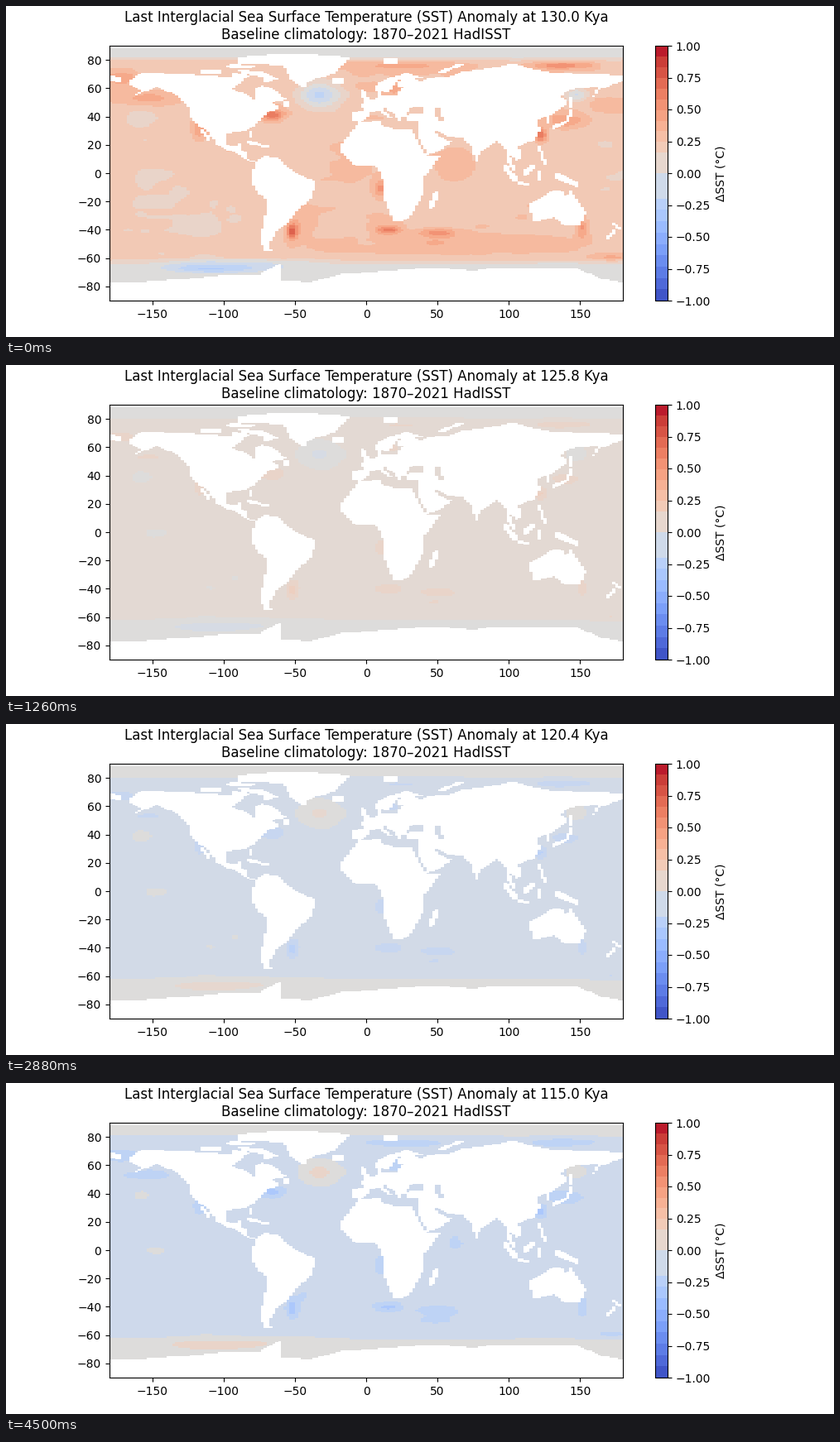
Write a matplotlib script that moves like this. It is 1000 px wide and 400 px high and loops after 4530 ms.

```python
import numpy as np
import matplotlib.pyplot as plt
from matplotlib.animation import FuncAnimation
from matplotlib.cm import ScalarMappable
from matplotlib.colors import ListedColormap, Normalize
from matplotlib.path import Path

FRAMES, INTERVAL = 151, 30
COOLWARM = plt.get_cmap("coolwarm")
NORM = Normalize(-1, 1)
LON, LAT = np.meshgrid(np.arange(-179, 180, 2), np.arange(-89.5, 90, 1))


def region(*coast):
    """Cells inside a coastline given as lon, lat pairs."""
    points = np.column_stack([LON.ravel(), LAT.ravel()])
    path = Path(np.reshape(coast, (-1, 2)))
    return path.contains_points(points).reshape(LON.shape)


def strip(lon0, lat0, lon1, lat1, radius=1.1):
    """Cells near the line between two places."""
    dx, dy = lon1 - lon0, lat1 - lat0
    along = ((LON - lon0) * dx + (LAT - lat0) * dy) / (dx * dx + dy * dy)
    along = np.clip(along, 0, 1)
    return np.hypot(LON - lon0 - along * dx, LAT - lat0 - along * dy) < radius


def blob(lon, lat, width, height, power=2):
    r2 = ((LON - lon) / width) ** 2 + ((LAT - lat) / height) ** 2
    return np.exp(-r2 ** (power / 2))


def rise(x):
    return 1 / (1 + np.exp(-x))


def americas():
    canada = region(-167, 65, -157, 71, -128, 70, -95, 68, -94, 71.5, -82, 69,
                    -94, 59, -82, 55, -79, 51.5, -77, 60, -73, 62, -65, 59.5,
                    -56, 52, -66, 50, -68, 46, -124, 46, -133, 55, -147, 60.5,
                    -163, 54.7, -157, 58.7, -165, 61.5)
    south_of_canada = region(-124, 48, -64, 49, -61, 46, -70, 42.5, -76, 36,
                             -81, 31.5, -84, 30, -97, 28, -97.5, 21, -95, 18.5,
                             -91, 18.5, -89, 21.3, -87, 21, -88, 16, -83.5, 15,
                             -83, 10, -77, 8.5, -80, 7, -92, 14.5, -105, 19.5,
                             -106, 23, -113, 31, -118, 34, -124, 40)
    south = region(-77, 8.5, -72, 12, -62, 10.5, -50, 0, -35, -6, -39, -18,
                   -48, -26, -57, -37, -62, -39, -65, -45, -69, -52, -65, -55,
                   -71, -55, -75, -48, -71, -30, -70, -19, -76, -14, -81, -5,
                   -80, 1)
    greenland = region(-90, 76.5, -73, 77, -58, 75.5, -53, 66, -44, 60,
                       -40, 65, -22, 70.5, -11, 82, -45, 84.3, -70, 83.5,
                       -90, 82)
    baffin = region(-90, 73.5, -72, 71.5, -62, 66.5, -72, 63.5, -72, 68,
                    -88, 70.5)
    return canada | south_of_canada | south | greenland | baffin


def old_world():
    africa = region(-17, 21, -17, 14, -8, 4.5, 6, 5, 9.5, 0, 13, -9, 12, -17,
                    18.5, -34, 26, -34, 32, -29, 35.5, -22, 40.5, -14, 39, -5,
                    51, 11.5, 43, 11.5, 37, 20, 33, 28, 32, 31.5, 20, 31,
                    10.5, 34, 11, 37, -6, 35.7, -10, 30)
    europe = region(-9, 43, -9, 37, -5, 36.2, 0, 39, 3, 43, 13, 45.5, 19, 42,
                    23, 36.5, 24, 40, 28.5, 42, 31, 46.5, 39, 47, 41, 42,
                    48, 42, 62, 50, 62, 60, 24, 59.5, 21, 55, 10, 54.5,
                    3, 51.5, -4.5, 48.3, -1, 44)
    north = region(62, 58, 62, 69, 44, 67, 38, 64.5, 33, 66.5, 41, 67, 28, 71,
                   12, 66, 5, 61, 7, 58, 16, 57, 18, 61, 23, 65.5, 22, 61,
                   30, 60)
    asia = region(27, 40.5, 28, 36.8, 36, 36.5, 35, 28, 43, 13, 52, 16,
                  59.5, 22.5, 50, 26, 48, 30, 57, 26, 67, 25, 73, 19, 77, 8,
                  80, 15, 91, 22.5, 98, 16, 98.5, 8, 103, 1.5, 103, 6, 100, 13,
                  105, 9, 109, 12, 106, 19, 117, 23, 122, 30, 119, 38,
                  125, 39.5, 127, 34.5, 129, 36, 128, 40, 140, 49, 140, 52,
                  60, 55, 45, 42, 31, 41.5)
    siberia = region(60, 50, 60, 69, 67, 72, 80, 73, 104, 77.5, 113, 74,
                     130, 71, 160, 70, 180, 69, 180, 65, 163, 59, 157, 51,
                     162, 61, 143, 59.3, 136, 54.5, 140, 48)
    australia = region(114, -22, 116, -34.5, 131, -31.5, 140, -37.5, 150, -37,
                       153.5, -28, 142.5, -11, 140, -17, 136, -12, 130, -12,
                       122, -18)
    caspian = strip(49.5, 44.5, 51.5, 38.5, 2)
    return (africa | europe | north | asia | siberia | australia) & ~caspian


THIN_LAND = [
    (-115, 30, -110, 24), (-82, 30, -80.5, 26), (-84, 22, -75, 20.3),
    (-73, 19, -69, 19), (10.5, 44, 16.5, 39.5), (9, 54, 9.5, 57),
    (131, 32.5, 139, 35.8), (140.5, 37, 143, 43.5), (142.7, 47, 142.7, 53),
    (106, -7, 114, -8), (120.5, -4, 121.5, 1), (121, 18, 125, 7),
    (173, -36, 177, -39), (168, -46, 173, -41.5), (-96, 75.5, -80, 75.3),
    (52, 71.5, 66, 76.5),
]
WIDE_LAND = [
    (-2.5, 57, -.5, 52), (-22, 65, -17, 65), (-57, 49, -55, 48.5),
    (97, 4, 104, -4), (111, 0, 116, 4.5), (134, -2, 147, -8),
    (45.5, -23, 48.5, -15), (-115, 71.5, -104, 71.5), (14, 79, 20, 79),
    (-180, 67.5, -173, 66),
]


def antarctica():
    lon = [-180, -162, -125, -98, -75, -60, -59, -40, -18, 15, 46, 75, 90, 145,
           166, 180]
    edge = [-77.5, -77, -74.5, -72, -71.5, -63, -75.5, -77, -71.5, -69, -66.5,
            -69, -66.5, -66.5, -75, -77]
    return LAT < np.interp(LON, lon, edge)


def make_land():
    land = americas() | old_world() | antarctica() | (LAT > 88.2)
    for line in THIN_LAND:
        land |= strip(*line)
    for line in WIDE_LAND:
        land |= strip(*line, radius=2)
    return land


# lon, lat, width, height, strength
SPOTS = [
    (-135, -12, 62, 38, -.08), (172, 5, 32, 34, -.07), (85, -18, 25, 9, -.06),
    (-52, -41, 4, 6, .5), (-44, -32, 9, 10, .12), (-66, 41, 10, 4, .42),
    (15, -40, 9, 3, .42), (51, -42, 14, 3, .27), (122, 27, 4, 5, .45),
    (140, 37, 14, 5, .24), (151, -39, 4, 7, .28), (10, -11, 5, 7, .26),
    (-117, 31, 5, 8, .24), (-172, 67, 13, 5, .24), (-152, 53, 20, 5, .18),
    (170, 47, 22, 6, .12), (19, 60, 6, 5, .22), (25, 76, 40, 5, .17),
    (138, 76, 22, 3, .32), (62, 6, 11, 10, .13), (-97, -5, 12, 4, .12),
    (-12, 8, 14, 14, .09), (60, -50, 90, 7, .1), (172, -60, 16, 3, .18),
    (-33, 55, 14, 9, -.42), (147, 55, 8, 5, -.3), (-159, 39, 13, 8, -.12),
    (-147, 0, 7, 3, -.1), (-115, -40, 25, 14, -.05),
]


def make_anomaly():
    field = np.full(LON.shape, .235)
    for *shape, strength in SPOTS:
        field += strength * blob(*shape)
    rng = np.random.default_rng(8)
    for _ in range(420):
        lon, lat = rng.uniform(-180, 180), rng.uniform(-62, 80)
        field += rng.normal(0, .025) * blob(lon, lat, rng.uniform(4, 12),
                                            rng.uniform(1.5, 4.5))
    field *= rise((80.5 - LAT) / .9) * rise((LAT + 62.5) / 1.2)
    field -= .17 * blob(-100, -65, 42, 5, 4)
    field -= .14 * blob(-112, -68, 24, 2.2)
    field -= .06 * blob(-145, -57, 12, 4) + .07 * blob(-45, -62, 18, 3)
    field -= .06 * blob(135, -66, 40, 2.5)
    return field


def bar_colors():
    edges = np.concatenate([np.linspace(-1, -.2, 10), [0],
                            np.linspace(.16, 1, 11)])
    middles = (edges[:-1] + edges[1:]) / 2
    band = np.searchsorted(edges, np.linspace(-.998, .998, 500)) - 1
    return ListedColormap(COOLWARM(NORM(middles[band])))


LAND_MASK = make_land()
ANOMALY = make_anomaly()


def strength_at(frame):
    return np.interp(frame, [0, 13, 27, 42, 61, 79, 111, 150],
                     [1, .75, .43, .2, 0, -.18, -.4, -.46])


def shaded(frame):
    """Color the scaled anomaly in even steps, finer near zero."""
    strength = strength_at(frame)
    step = np.clip(.26 * abs(strength), .03, .105)
    values = np.round(ANOMALY * strength / step) * step
    rgba = COOLWARM(NORM(values))
    rgba[LAND_MASK] = 1
    return rgba


fig, ax = plt.subplots(figsize=(10, 4), dpi=100)
image = ax.imshow(shaded(0), extent=(-180, 180, -90, 90), origin="lower",
                  aspect="auto", interpolation="nearest")
ax.set_xticks(range(-150, 151, 50))
ax.set_yticks(range(-80, 81, 20))
title = ax.set_title("")
bar = fig.colorbar(ScalarMappable(NORM, bar_colors()), ax=ax)
ticks = np.linspace(-1, 1, 9)
bar.set_ticks(ticks, labels=[f"{v:.2f}".replace("-", "\u2212") for v in ticks])
bar.set_label("ΔSST (°C)")


def update(frame):
    image.set_data(shaded(frame))
    title.set_text("Last Interglacial Sea Surface Temperature (SST) Anomaly "
                   f"at {130 - frame / 10:.1f} Kya\n"
                   "Baseline climatology: 1870–2021 HadISST")
    return image, title


animation = FuncAnimation(fig, update, frames=FRAMES, interval=INTERVAL,
                          repeat=True, repeat_delay=0, blit=False)
plt.show()
```
